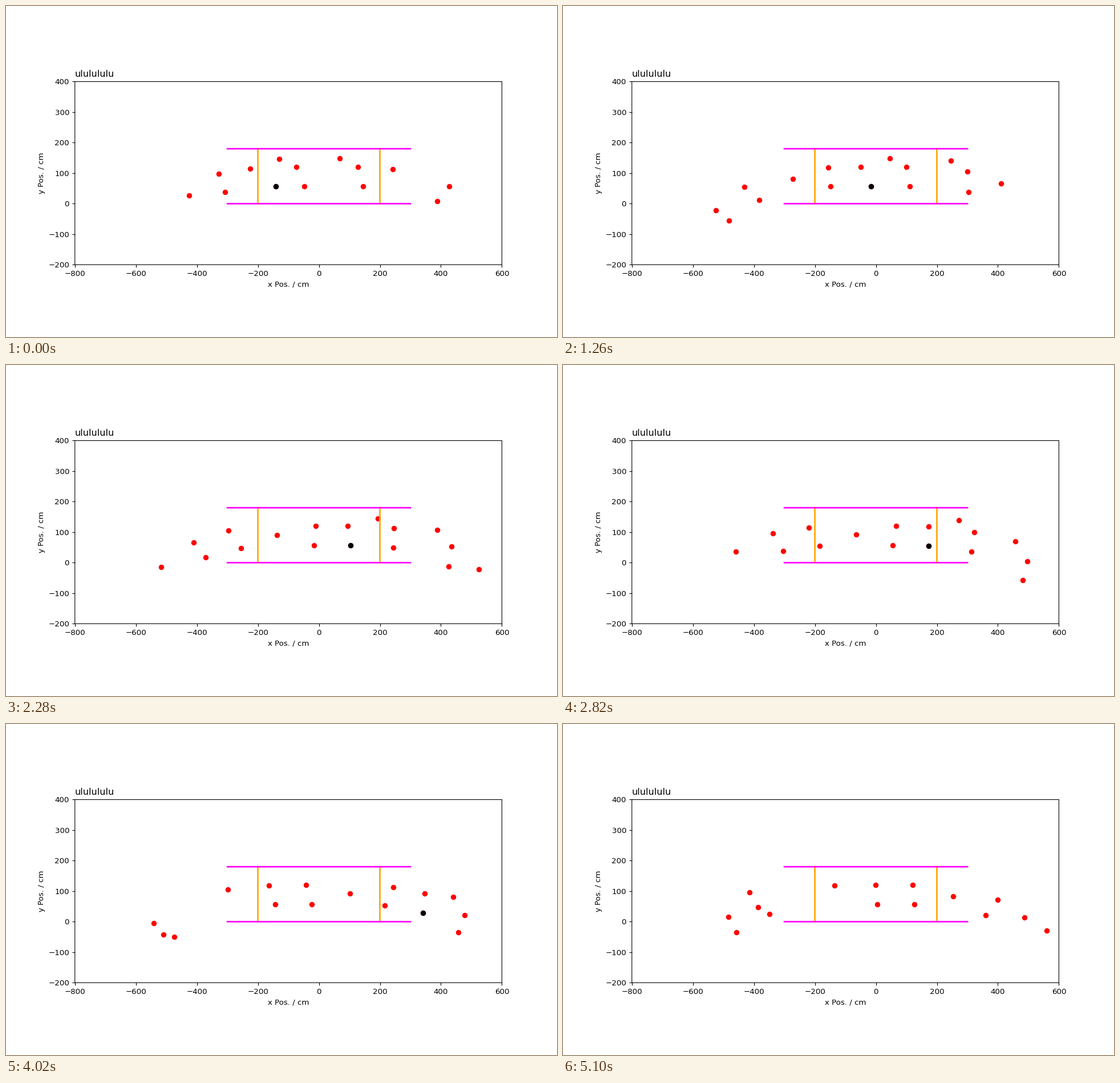
Animation of 966x580 px, one loop 5.16 s. Source, as a matplotlib script:

```python
import numpy as np
import matplotlib.pyplot as plt
from matplotlib.animation import FuncAnimation

FRAMES, STEP = 86, 60
plt.rcParams.update({"path.snap": False, "font.size": 9.66,
                     "lines.linewidth": 1.93, "lines.markersize": 5.8})

# lane height in cm, speed in cm per beat, beats at which walkers pass x = 0
ROWS = [
    (148, 8.3, [-8.3, 15.7, 140.5]),
    (120, 8.2, [-53.4, -29.6, -15.5, 9, 27.4, 40.3, 75.2, 90, 106.4, 151.7]),
    (92, 7.7, [56.8, 140.8]),
    (57, 7.5, [-52.7, -19.4, 6.4, 41.2, 73, 89.1, 136.7, 153.3]),
]
LEADER_LANE = 57
FLOOR, SIDE = -58, 565      # limits of the camera's view, in cm

GRID = np.linspace(-700, 700, 1401)


def lane_height(lane, x):
    """Lanes are flat in the middle and bend down towards both sides."""
    return lane - 160 * (x / (510 + 0.25 * lane)) ** 4


def place(lane, walked):
    """Point at a walked distance along a lane, measured from x = 0."""
    rise = np.diff(lane_height(lane, GRID))
    length = np.append(0, np.cumsum(np.hypot(np.diff(GRID), rise)))
    x = np.interp(walked, length - length[-1] / 2, GRID)
    y = lane_height(lane, x)
    hidden = (y < FLOOR) | (np.abs(x) > SIDE)
    return np.where(hidden, np.nan, x), np.where(hidden, np.nan, y)


def crowd_at(n):
    beat = n + n * n / 1500     # everybody speeds up a little
    rows = [place(lane, speed * (beat - np.array(passing)))
            for lane, speed, passing in ROWS]
    return np.concatenate(rows, axis=1)


def leader_at(n):
    return place(LEADER_LANE, np.array([-141 + 5.4 * n + 0.0275 * n * n]))


fig, ax = plt.subplots(figsize=(9.66, 5.8), dpi=100)
ax.set_aspect("equal")
ax.set(xlim=(-800, 600), ylim=(-200, 400),
       xlabel="x Pos. / cm", ylabel="y Pos. / cm")
ax.set_title("ululululu", loc="left")

crowd, = ax.plot([], [], "o", color="red")
under, = ax.plot([], [], "o", color="red")
marked, = ax.plot([], [], "o", color="black")
for x in (-200, 200):
    ax.plot([x, x], [0, 180], color="orange")
for y in (0, 180):
    ax.plot([-300, 300], [y, y], color="magenta")


def update(n):
    crowd.set_data(*crowd_at(n))
    for dot in (under, marked):
        dot.set_data(*leader_at(n))
    return crowd, under, marked


anim = FuncAnimation(fig, update, frames=FRAMES, interval=STEP,
                     repeat=True, repeat_delay=0, blit=False)
plt.show()
```
